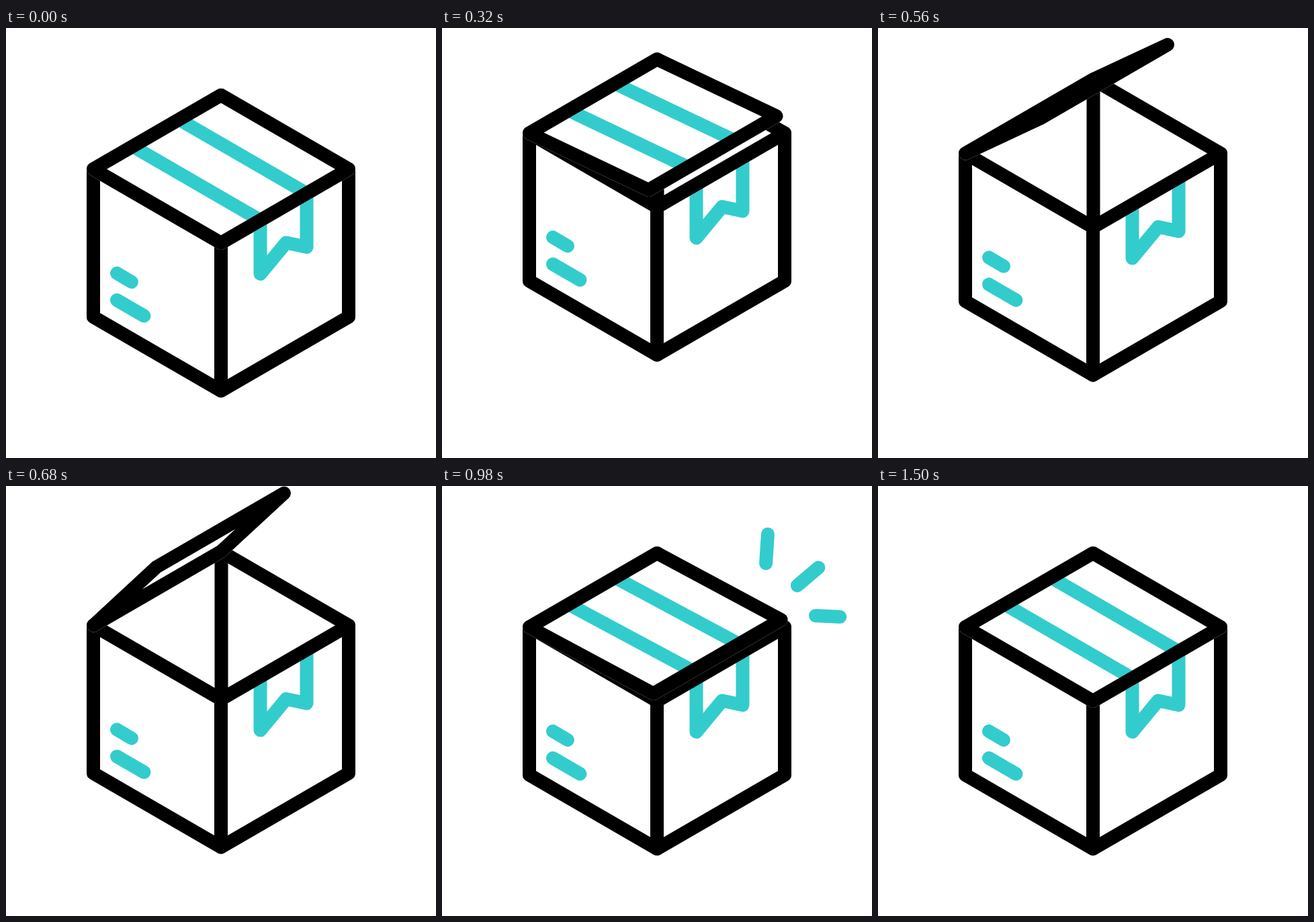
Recreate the animation shown at these times as an HTML page with a canvas. Size 640 px wide and 640 px high, loop 2.4 s.

```html
<!DOCTYPE html>
<html lang="en">
<head>
<meta charset="utf-8">
<title>Box</title>
<style>
  html, body { margin: 0; width: 100%; height: 100%; overflow: hidden; background: #fff; }
  canvas { display: block; }
</style>
</head>
<body>
<canvas width="640" height="640"></canvas>
<script>
const ctx = document.querySelector('canvas').getContext('2d');
const LOOP = 2400, STEP = 20;
const TEAL = '#33cccc', BLACK = '#000', WHITE = '#fff';

// Eased progress from 0 to 1 between two times
function ease(t, from, to) {
  const p = Math.min(1, Math.max(0, (t - from) / (to - from)));
  return p * p * (3 - 2 * p);
}

function line(color, points, closed, cap = 'round') {
  ctx.beginPath();
  points.forEach(([x, y]) => ctx.lineTo(x, y));
  if (closed) ctx.closePath();
  ctx.strokeStyle = color;
  ctx.lineCap = cap;
  ctx.stroke();
}

function drawBody() {
  line(TEAL, [[165, 365], [187, 378]]);
  line(TEAL, [[165, 405], [205.5, 428.5]]);
  line(TEAL, [[378.5, 286], [378.5, 366], [417, 319.5], [447.5, 326], [447.5, 246]], false, 'butt');
  line(BLACK, [[130, 210], [320, 100], [510, 210], [510, 430], [320, 540], [130, 430]], true);
  line(BLACK, [[130, 210], [320, 320], [510, 210]]);
  line(BLACK, [[320.5, 100], [320.5, 320]]);
  line(BLACK, [[320, 320], [320, 540]]);
}

// The lid hangs on the edge from (130,210) to (320,100); "lift" raises its free side
function drawLid(lift) {
  const vx = 190 - lift * 0.488, vy = 110 - lift;
  const outline = [[130, 210], [320, 100], [320 + vx, 100 + vy], [130 + vx, 210 + vy]];
  line(WHITE, outline, true);
  ctx.fillStyle = WHITE;
  ctx.fill();
  const topVisible = 190 * vy + 110 * vx > 0;
  if (topVisible) {
    for (const u of [0.308, 0.671]) {
      const x = 130 + 190 * u, y = 210 - 110 * u;
      line(TEAL, [[x, y], [x + vx, y + vy]], false, 'butt');
    }
  }
  line(BLACK, outline, true);
}

function drawRays(t) {
  const head = ease(t, 880, 1005), tail = ease(t, 950, 1105);
  if (head <= 0 || tail >= 1) return;
  const rays = [[481.7, 120.5, 485.3, 66], [525, 151.5, 564.5, 118], [551.5, 192.8, 597, 195]];
  for (const [x1, y1, x2, y2] of rays) {
    const at = k => [x1 + (x2 - x1) * k, y1 + (y2 - y1) * k];
    line(TEAL, [at(tail), at(head)]);
  }
}

function draw(t) {
  const rise = 55 * (ease(t, 0, 355) - ease(t, 355, 728));
  const lift = 197 * (ease(t, 213, 688) - ease(t, 688, 880))
             + 45 * (ease(t, 880, 1190) - ease(t, 1190, 1500));
  ctx.fillStyle = WHITE;
  ctx.fillRect(0, 0, 640, 640);
  ctx.lineWidth = 20;
  ctx.lineJoin = 'round';
  ctx.save();
  ctx.translate(0, -rise);
  drawBody();
  drawLid(lift);
  ctx.restore();
  drawRays(t);
}

const start = performance.now();
function tick() {
  const t = (performance.now() - start) % LOOP;
  draw(Math.floor(t / STEP) * STEP);
  requestAnimationFrame(tick);
}
tick();
</script>
</body>
</html>
```
